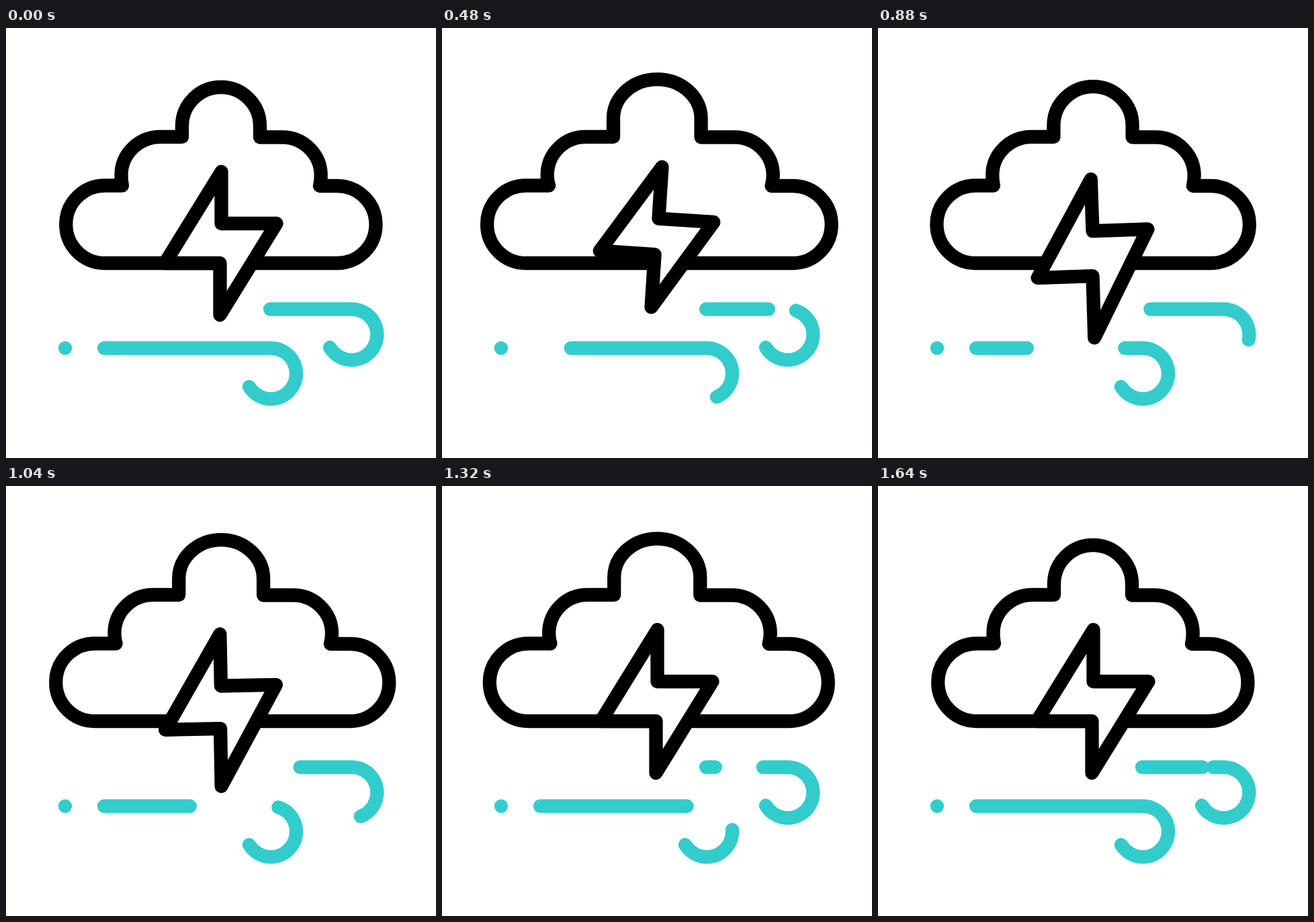
An HTML page for the animation above (1680 ms loop, 640 px wide and 640 px high).

```html
<!DOCTYPE html>
<html lang="en">
<head>
<meta charset="utf-8">
<title>Thunderstorm</title>
<style>
  html, body { margin: 0; width: 100%; height: 100%; overflow: hidden; background: #fff; }
  svg { display: block; width: 100vw; height: 100vh; }
  path { fill: none; stroke-width: 20.3; stroke-linecap: round; stroke-linejoin: round; }
  #cloud, #bolt { stroke: #000; }
  #bolt { fill: #fff; }
  .wind { stroke: #3cc; }
</style>
</head>
<body>
<svg viewBox="0 0 640 640">
  <path id="cloud"/>
  <path id="bolt"/>
  <path class="wind" d="M88 476.5h.01"/>
  <path class="wind" id="low" d="M146 476.5H394A37.8 37.8 0 1 1 362 534"/>
  <path class="wind" id="high" d="M393 418.5H515A37.8 37.8 0 1 1 482 475.5"/>
</svg>
<script>
const LOOP = 1680, STEP = 40;
const $ = id => document.getElementById(id);
const mix = (a, b, k) => a + (b - a) * k;
const progress = (from, to, t) => Math.min(1, Math.max(0, (t - from) / (to - from)));
const ease = u => Math.sin(u * Math.PI / 2) ** 2;

// The cloud swells twice per loop.
function drawCloud(t) {
  const v = Math.sin(2 * Math.PI * progress(30, 1590, t)) ** 2;
  const x = (base, shift) => base + shift * v;
  const left = x(147, -23.5), right = x(493, 31);
  const l1 = x(230, -17.5), l2 = x(171.5, -15.7);
  const r1 = x(411, 26), r2 = x(468.7, 25.5);
  const c1 = x(262, -7.4), c2 = x(378, 8), side = x(146, -12.4);
  const rx = (c2 - c1) / 2;
  $("cloud").setAttribute("d",
    `M${left} 350A57.75 57.75 0 0 1 ${left} 234.5H${x(173, -14.7)}` +
    `Q${l2} 228 ${l2} 219A${l1 - l2} 57 0 0 1 ${l1} 162H${c1}V${side}` +
    `A${rx} 58 0 0 1 ${c2} ${side}V162.5H${r1}` +
    `A${r2 - r1} 57 0 0 1 ${r2} 219.5Q${r2} 228 ${x(467, 25)} 235H${right}` +
    `A57.5 57.5 0 0 1 ${right} 350Z`);
}

// The bolt is point-symmetric: tip, notch and corner, then the same negated.
const half = [[1, -106.5], [1, -29.5], [83, -29.5]];
const rest = { at: 40, drop: 0, tilt: 0, tip: 0 };
const poses = [
  rest,
  { at: 700, drop: -10, tilt: 5, tip: 2 },
  { at: 860, drop: 11.3, tilt: -2, tip: 15 },
  { ...rest, at: 1260 }
];

function drawBolt(t) {
  const i = t < poses[1].at ? 0 : t < poses[2].at ? 1 : 2;
  const [a, b] = [poses[i], poses[i + 1]];
  const k = ease(progress(a.at, b.at, t));
  const [drop, tilt, tip] = ["drop", "tilt", "tip"].map(name => mix(a[name], b[name], k));
  const cos = Math.cos(tilt * Math.PI / 180), sin = Math.sin(tilt * Math.PI / 180);
  const place = (sign, shift) => half.map(([x, y], n) => [
    319.5 + sign * (x * cos - y * sin),
    320.5 + sign * (x * sin + y * cos) + shift + (sign < 0 && n === 0 ? tip : 0)
  ]);
  // The lower half moves further than the upper one.
  const points = [...place(1, drop), ...place(-1, drop * 1.7)];
  $("bolt").setAttribute("d", "M" + points.join("L") + "Z");
}

// A gap runs along each line at constant speed, opening and closing on the way.
const winds = [
  { id: "low", from: 209, speed: 0.3244, size: 150, open: 110, peak: 720, close: 1640 },
  { id: "high", from: -12, speed: 0.2385, size: 104, open: 220, peak: 820, close: 1710 }
];
for (const w of winds) {
  w.path = $(w.id);
  w.length = w.path.getTotalLength();
}

function drawWind(w, t) {
  const gap = w.size * ease(progress(w.open, w.peak, t)) * (1 - progress(w.peak, w.close, t) ** 2);
  if (gap < 0.5) {
    w.path.style.strokeDasharray = "none";
    return;
  }
  const end = w.from + w.speed * (t - 40) + gap;
  w.path.style.strokeDasharray = `${w.length - gap} ${gap}`;
  w.path.style.strokeDashoffset = w.length - end % w.length;
}

function draw(now) {
  const t = Math.floor(now % LOOP / STEP) * STEP;
  drawCloud(t);
  drawBolt(t);
  winds.forEach(w => drawWind(w, t));
}

const start = performance.now();
function tick() {
  draw(performance.now() - start);
  requestAnimationFrame(tick);
}
tick();
</script>
</body>
</html>
```
